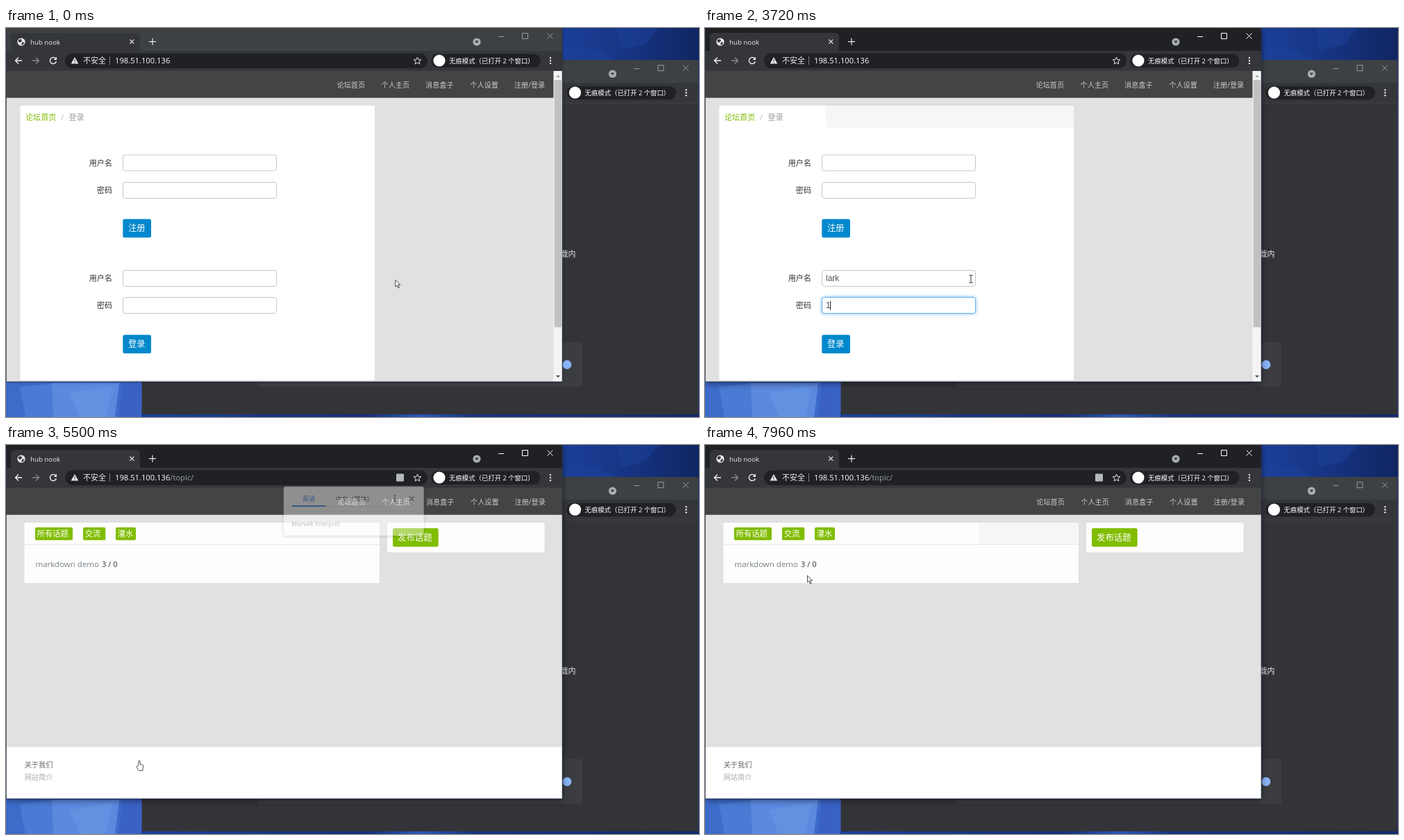
An HTML page for the animation above (8 s loop, 998 px wide and 561 px high).

```html
<!DOCTYPE html>
<html lang="zh">
<head>
<meta charset="utf-8">
<title>Forum login</title>
<style>
html, body { margin: 0; width: 100%; height: 100%; overflow: hidden; background: #323337; }
svg { display: block; width: 100%; height: 100%; }
text { font-family: "Open Sans", "Noto Sans CJK SC", "Noto Sans CJK", sans-serif; white-space: pre; }
.typed { font-family: "Liberation Sans", Arial, sans-serif; }
.glow { filter: drop-shadow(0 0 2.5px rgba(82,168,236,.8)); }
.pop { filter: drop-shadow(0 1px 2px rgba(0,0,0,.45)); }
</style>
</head>
<body>
<svg id="stage" viewBox="0 0 998 561" preserveAspectRatio="none"></svg>
<script>
const LOOP = 8000;
const GREEN = '#80bd01', BLUE = '#0088cc', PALE = '#e8eaed', MUTED = '#9aa0a6';

// y is the vertical middle of the text
const text = (x, y, size, fill, str, more = '') =>
  `<text x="${x}" y="${y + size * .37}" font-size="${size}" fill="${fill}" ${more}>${str}</text>`;
const rect = (x, y, x2, y2, fill, r = 0, more = '') =>
  `<rect x="${x}" y="${y}" width="${x2 - x}" height="${y2 - y}" rx="${r}" fill="${fill}" ${more}/>`;
const line = (d, stroke, w = 1, more = '') =>
  `<path d="${d}" fill="none" stroke="${stroke}" stroke-width="${w}" ${more}/>`;
const circle = (x, y, r, fill, more = '') =>
  `<circle cx="${x}" cy="${y}" r="${r}" fill="${fill}" ${more}/>`;
const group = (id, body, more = '') => `<g id="${id}" ${more}>${body}</g>`;
const dots = (x, y, fill) => [-4, 0, 4].map(d => circle(x, y + d, 1.2, fill)).join('');
const cross = (x, y, r, stroke, w = 1) =>
  line(`M${x - r} ${y - r}l${2 * r} ${2 * r}m0 ${-2 * r}l${-2 * r} ${2 * r}`, stroke, w);

const wallpaper = `
  <defs>
    <linearGradient id="night"><stop stop-color="#1b3f98"/><stop offset=".45" stop-color="#173585"/><stop offset="1" stop-color="#102662"/></linearGradient>
    <linearGradient id="strip"><stop stop-color="#1c419b"/><stop offset=".4" stop-color="#122e78"/><stop offset=".5" stop-color="#2c58b8"/><stop offset=".6" stop-color="#14327f"/><stop offset="1" stop-color="#102a6c"/></linearGradient>
  </defs>
  ${rect(0, 0, 998, 561, '#173585')}
  ${rect(801, 0, 998, 46, 'url(#night)')}
  <path d="M802 28l50 4 25 14h-75zM880 0h60l-20 24-35 8z" fill="#1d429c" opacity=".5"/>
  ${rect(0, 508, 196, 561, '#3d6bca')}
  <path d="M20 518l48-6 12 49H28z" fill="#4a7ad3"/>
  <path d="M66 512h97l-6 49H68z" fill="#5b89de"/>
  <path d="M92 526l62-10-10 45h-38z" fill="#6896e4" opacity=".6"/>
  <path d="M168 510h27v51h-33z" fill="#3a62c5"/>
  ${rect(195, 556, 998, 561, 'url(#strip)')}`;

const winButtons = id => group(id,
  line('M709 12.5h8M743.5 7.5h8v8h-8zM779.5 7.5l8 8m0-8l-8 8', 'currentColor'), 'color="#999c9f"');

// The parts that both browser windows share
const frame = (barId, btnId) => `
  ${rect(0, 0, 801, 34, '#3d4144', 0, `id="${barId}"`)}
  ${rect(0, 33, 801, 62, '#35363a')}
  ${circle(678, 20, 5.6, '#a9adb1')}<path d="M675.3 18.6h5.4l-2.7 3.3z" fill="#2b2c2f"/>
  ${winButtons(btnId)}
  ${rect(612, 37.5, 769.5, 57, '#202124', 9.7)}
  ${circle(624, 47, 8.6, '#fff')}
  ${text(638, 47.2, 9.4, '#fff', '无痕模式（已打开 2 个窗口）')}
  ${dots(784, 47, PALE)}`;

const backWindow = `<g transform="translate(195.5 46.2)">
  ${rect(0, 0, 801.5, 511, '#333438')}
  ${frame('backBar', 'backBtns')}
  ${rect(0, 61.5, 801.5, 62.3, '#46484c')}</g>
  ${rect(362, 453, 830, 517.5, '#3b3d41', 3)}
  ${circle(808, 485.5, 6.4, '#8ab4f8')}
  ${text(820.5, 326, 11, PALE, '载内', 'text-anchor="end"')}`;

const frontChrome = `
  ${frame('bar', 'btns')}
  <path d="M3 34q4 0 4-4V13q0-6 6-6h174q6 0 6 6v17q0 4 4 4z" fill="#35363a"/>
  ${circle(22, 20, 5.6, PALE)}<path d="M18 17l4-1 1 3-3 2-2-1zM23 21l3-1-1 4-3 0z" fill="#35363a"/>
  ${text(35, 20, 9.7, PALE, 'hub nook')}
  ${cross(181.3, 19.7, 3, PALE, 1.2)}
  ${line('M206 19.7h10M211 14.7v10', PALE, 1.2)}
  ${line('M23 47H13.5M18 42.5L13.5 47l4.5 4.5', '#f1f3f4', 1.4)}
  ${line('M38 47h9.5M43 42.5L47.5 47 43 51.5', '#85888c', 1.4)}
  ${line('M71.5 44A4.6 4.6 0 1 0 72.4 48.3', '#f1f3f4', 1.4)}<path d="M73 41.5v4.4h-4.4z" fill="#f1f3f4"/>
  ${rect(85, 36.5, 607, 58, '#202124', 10.8)}
  <path d="M99 42l5.3 9.6H93.7z" fill="${PALE}"/>${line('M99 45.3v3M99 49.2v1.2', '#202124')}
  ${text(111, 47.2, 11, PALE, '不安全')}
  ${line('M149.5 41v12', '#8a8d91', .9)}
  ${text(157, 47, 11.2, '#fff', '198.51.100.136<tspan id="urlPath" fill="#9aa0a6">/topic/</tspan>')}
  ${rect(555, 37.7, 580, 57, '#5f6368', 9.6, 'id="chip"')}
  ${rect(562, 41.5, 573, 52.5, '#b4b8bc', 1, 'id="langIcon"')}
  <path d="M592.5 42l1.5 3.5 3.8.3-2.9 2.5.9 3.7-3.3-2-3.3 2 .9-3.7-2.9-2.5 3.8-.3z" fill="none" stroke="${PALE}"/>`;

const NAV = [[476.5, '论坛首页'], [540.5, '个人主页'], [604, '消息盒子'], [668.3, '个人设置'], [731.8, '注册/登录']];
const nav = group('nav', NAV.map(([x, s]) => text(x, 82, 10.2, '#ccc', s)).join(''));

const field = (y, h = 23.5) => rect(168.5, y + .5, 389.5, y + h, '#fff', 3, 'stroke="#c8c8c8"');
const glow = (id, y) => rect(168.5, y + .5, 389.5, y + 23.5, '#fff', 3, `id="${id}" class="glow" stroke="#62b1ee"`);
const label = (y, s) => text(153, y, 11.1, '#333', s, 'text-anchor="end"');
const button = (y, s, id) =>
  rect(168.3, y, 209, y + 26.7, BLUE, 2.5, `id="${id}"`) + text(176, y + 13.2, 12.2, '#fff', s);
const typed = (id, y) =>
  text(174, y, 12, '#555', '', `id="${id}" class="typed"`);

const loginPage = group('login', `
  ${rect(20.5, 112, 531, 508, '#fff', 2)}
  ${rect(174, 112, 531, 143.5, '#f6f6f6', 0, 'id="loginTint"')}
  ${text(28, 128.5, 11.1, GREEN, '论坛首页')}
  ${text(79, 128.5, 11, '#bbb', '/')}
  ${text(90.5, 128.5, 11.1, '#999', '登录')}
  ${field(182.5)}${field(222)}${field(349)}${field(388)}
  ${glow('userGlow', 349)}${glow('passGlow', 388)}
  ${label(194.5, '用户名')}${label(233.7, '密码')}${label(361, '用户名')}${label(400, '密码')}
  ${button(275.5, '注册', 'joinBtn')}${button(442.5, '登录', 'loginBtn')}
  ${typed('user', 361)}${typed('pass', 400)}
  ${rect(0, -6.5, 1, 6.5, '#222', 0, 'id="caret"')}
  ${rect(788.5, 62, 801, 510, '#f4f4f4')}
  ${rect(789.7, 75, 800, 431.5, '#c1c1c1')}
  <path d="M792 71l3-3.3 3 3.3z" fill="#a3a3a3"/><path d="M792 501l3 3.3 3-3.3z" fill="#505050"/>`);

const badge = (x, x2, s) => rect(x, 118.7, x2, 137.3, GREEN, 2) + text(x + 2.7, 128.3, 11.3, '#fff', s);
const topicPage = group('topic', `
  ${rect(26.5, 112, 538, 199, '#fdfdfd', 2)}
  ${rect(394, 112, 538, 143, '#f6f6f6', 0, 'id="topicTint"')}
  ${rect(26.5, 143, 538, 144, '#e6e6e6')}
  ${badge(42, 96, '所有话题')}${badge(111, 143.3, '交流')}${badge(158, 187, '灌水')}
  ${text(42.5, 172, 11.5, '#778087', 'markdown demo')}
  ${text(138, 171.5, 11.2, '#333', '3 / 0')}
  ${rect(549, 112, 775.5, 154.7, '#fdfdfd', 2)}
  ${rect(557, 120, 622.7, 146.7, GREEN, 2.5)}${text(564, 133.7, 12.4, '#fff', '发布话题')}
  ${rect(0, 435.5, 801, 510, '#fff')}
  ${text(26.7, 461.7, 10.2, '#666', '关于我们')}
  ${text(26.7, 479.7, 10.2, '#aaa', '网站简介')}`);

const popup = group('popup', `
  ${rect(396, 58.5, 605.5, 132, '#fff', 3.5, 'class="pop"')}
  ${text(424, 76.5, 9.6, '#1a73e8', '英语', 'font-weight="500"')}
  ${rect(408, 86.8, 458.7, 88.8, '#1a73e8')}
  ${text(473.5, 76.5, 9.4, '#444', '中文（简体）')}
  ${rect(458.7, 87.6, 546, 88.5, '#dadce0')}
  ${dots(562, 76.5, '#5f6368')}
  ${circle(587.3, 77, 9.6, '#dadce0', 'id="closeHover"')}
  ${cross(587.3, 76.7, 3.6, '#5f6368', 1.3)}
  ${rect(396, 95.7, 605.5, 96.6, '#e8eaed')}
  ${text(408, 114.7, 9, '#6b6f74', '<tspan font-weight="600">Morvek</tspan> Interpret')}`);

const cursors = `
  ${circle(0, 0, 9.5, '#ff0', 'id="click" opacity=".58"')}
  <g id="arrow"><path d="M.5.2V10l2.3-2 1.7 4 1.6-.7-1.7-3.9h3.1z" fill="#fff" stroke="#222" stroke-width=".8"/></g>
  <g id="beam">${line('M-2.5 -5.5h2l.5.5.5-.5h2M0 -5V5M-2.5 5.5h2l.5-.5.5.5h2', '#333')}</g>
  <g id="hand"><path d="M-1.2 7V1a1.2 1.2 0 0 1 2.4 0v4l3.5.8q1.6.5 1.2 2.5L5 11v3.2h-5.4L-4 9q-.3-1.8 1.5-1.4z" fill="#fff" stroke="#222" stroke-width=".8"/></g>`;

document.getElementById('stage').innerHTML = `${wallpaper}${backWindow}
  ${rect(0, 0, 801, 510, '#e1e1e1', 0, 'id="base"')}
  ${frontChrome}
  ${rect(0, 61.5, 801, 100.7, '#444')}
  ${loginPage}${topicPage}${nav}${popup}
  ${line('M.5 0v510M0 510.2h801.5M801.2 0v510', '#2c3550', .8)}
  ${cursors}`;

const $ = id => document.getElementById(id);
const show = (id, on) => $(id).style.display = on ? '' : 'none';
const within = (t, a, b) => t >= a && t < b;
const ramp = (t, a, b) => Math.min(1, Math.max(0, (t - a) / (b - a)));
const smooth = p => p * p * (3 - 2 * p);

// start, end, steps, from, to
const MOVES = [
  [980, 1440, 7, [560.3, 363], [383, 362]],
  [4160, 4930, 11, [383, 362], [192, 455.5]],
  [5910, 6670, 10, [192, 455.5], [589, 79]],
  [7460, 7960, 7, [589, 79], [147, 188]],
];
const CLICKS = [[1660, 1820, 382, 361], [5180, 5340, 191, 456], [6990, 7060, 587.3, 77]];

function pointer(t) {
  let pos = MOVES[0][3];
  for (const [a, b, n, from, to] of MOVES) {
    if (t < a) break;
    const step = Math.min(n, Math.floor((t - a) / (b - a) * (n - 1) + 1e-6) + 1);
    const p = smooth(step / n);
    pos = from.map((v, i) => v + (to[i] - v) * p);
  }
  return pos;
}

const onButton = (x, y) => within(x, 168, 209) && within(y, 442, 470);
const onField = (x, y) => within(x, 168, 390) && (within(y, 349, 373) || within(y, 388, 412));
const typedSoFar = (word, t, a, b) =>
  t < a ? '' : word.slice(0, 1 + Math.floor(ramp(t, a, b) * (word.length - 1) + 1e-6));

function draw(t) {
  const active = t >= 1660, loaded = t >= 5500;
  $('bar').setAttribute('fill', active ? '#202124' : '#3d4144');
  $('btns').setAttribute('color', active ? '#fff' : '#999c9f');
  $('base').style.filter = active
    ? 'drop-shadow(0 2px 5px rgba(0,0,0,.55))' : 'drop-shadow(0 1px 2px rgba(0,0,0,.3))';
  show('login', !loaded);
  show('topic', loaded);
  show('urlPath', t >= 5420);
  show('langIcon', loaded);
  show('chip', within(t, 5560, 7230));
  show('loginTint', within(t, 1900, 5180));
  show('topicTint', t >= 7060);
  $('nav').setAttribute('transform', `translate(${loaded ? .7 : 0} 0)`);

  $('userGlow').style.opacity = ramp(t, 1660, 1900) * (1 - ramp(t, 3150, 3340));
  $('passGlow').style.opacity = ramp(t, 3150, 3340) * (1 - ramp(t, 5160, 5340));
  $('user').textContent = typedSoFar('lark', t, 2360, 2640);
  $('pass').textContent = typedSoFar('123', t, 3720, 3930);
  const inPass = t >= 3170;
  const entry = $(inPass ? 'pass' : 'user');
  const caretOn = within(t, 1660, 5180) && !within(t, 2210, 2360) && !within(t, 4460, 4930);
  show('caret', caretOn);
  const width = entry.textContent && !loaded ? entry.getComputedTextLength() : 0;
  $('caret').setAttribute('transform', `translate(${174 + Math.floor(width)} ${inPass ? 400 : 360.7})`);

  const open = t < 5560 ? .4 : t < 5640 ? .8 : 1;
  const scale = .94 + .06 * open;
  show('popup', within(t, 5500, 7060));
  $('popup').style.opacity = open;
  $('popup').setAttribute('transform', `translate(501 95) scale(${scale}) translate(-501 -95)`);
  show('closeHover', t >= 6670);

  const [x, y] = pointer(t);
  const hand = onButton(x, y) && t < 5910;
  const beam = !loaded && onField(x, y);
  $('loginBtn').setAttribute('fill', hand ? '#0052cc' : BLUE);
  for (const [id, on] of [['hand', hand], ['beam', beam], ['arrow', !hand && !beam]]) {
    show(id, on);
    $(id).setAttribute('transform', `translate(${x} ${y})`);
  }
  const click = CLICKS.find(([a, b]) => within(t, a, b));
  show('click', click);
  if (click) $('click').setAttribute('transform', `translate(${click[2]} ${click[3]})`);
}

const start = performance.now();
function tick() {
  draw((performance.now() - start) % LOOP);
  requestAnimationFrame(tick);
}
tick();
</script>
</body>
</html>
```
